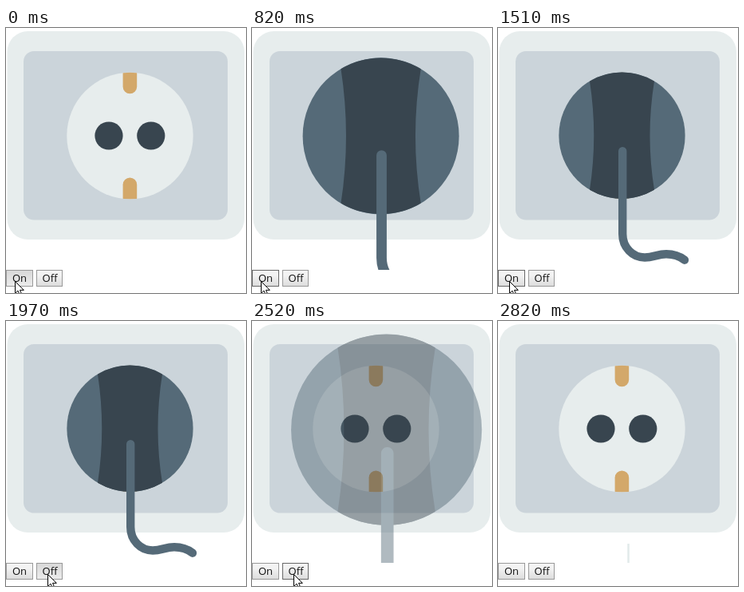
Write an HTML page that moves like this. It is 301 by 332 pixels and loops after 3400 ms.

```html
<!DOCTYPE html>
<html lang="en">
<head>
<meta charset="utf-8">
<title>Plug and socket</title>
<style>
  html, body { margin: 0; width: 100%; height: 100%; overflow: hidden; background: #fff; }
  svg { display: block; width: 301px; height: 332px; }
  .button rect { fill: url(#idle); stroke: #999; }
  .button.hover rect { fill: url(#idle); stroke: #686868; }
  .button.pressed rect { fill: url(#down); stroke: #999; }
  .button text { font: 13px "Open Sans", "Noto Sans", sans-serif; text-anchor: middle; fill: #111; }
</style>
</head>
<body>
<svg viewBox="0 0 301 332">
  <defs>
    <linearGradient id="idle" x2="0" y2="1">
      <stop offset=".3" stop-color="#f3f3f3"/><stop offset="1" stop-color="#dcdcdc"/>
    </linearGradient>
    <linearGradient id="down" x2="0" y2="1">
      <stop offset="0" stop-color="#d8d8d8"/><stop offset="1" stop-color="#ececec"/>
    </linearGradient>
    <clipPath id="view"><rect y="3" width="300" height="300"/></clipPath>
    <clipPath id="face"><circle cx="155.5" cy="135" r="79.2"/></clipPath>
  </defs>

  <g id="socket">
    <rect x="1.5" y="4" width="297.5" height="261" rx="26" fill="#e7eded"/>
    <rect x="22" y="29" width="256" height="211.5" rx="13" fill="#cbd4da"/>
    <circle cx="155.5" cy="135" r="79.2" fill="#e7eded"/>
    <g fill="#d3a86a" clip-path="url(#face)">
      <rect x="146.6" y="40" width="17.6" height="42.3" rx="8.8"/>
      <rect x="146.6" y="187.5" width="17.6" height="42" rx="8.8"/>
    </g>
    <g fill="#38454f">
      <circle cx="129" cy="135" r="17.6"/>
      <circle cx="181.8" cy="135" r="17.6"/>
    </g>
  </g>

  <g clip-path="url(#view)">
    <g id="plug">
      <circle cx="155.5" cy="134.7" r="79.2" fill="#556a78"/>
      <path d="M115 66.7A79.2 79.2 0 0 1 196 66.7Q185 134.7 196 202.7A79.2 79.2 0 0 1 115 202.7Q125.5 134.7 115 66.7Z" fill="#38454f"/>
      <path d="M156.2 154.3V258C156.2 275 169 287.5 184 287.5C195 287.5 200 283.3 211 283.3C220 283.3 228 286 234 290.7"
        fill="none" stroke="#556a78" stroke-width="10.4" stroke-linecap="round"/>
    </g>
  </g>
  <rect id="sliver" x="162.3" y="279" width="2.5" height="24" fill="#e2eaea"/>

  <g id="on" class="button">
    <rect x=".5" y="303.5" width="33" height="20"/><text x="17" y="318">On</text>
  </g>
  <g id="off" class="button">
    <rect x="38.5" y="303.5" width="32" height="20"/><text x="55" y="318">Off</text>
  </g>
  <path id="cursor" d="M.5 .5V15.5L4 12.2 6.6 18 9 17 6.5 11.4H11.3Z" fill="#fff" stroke="#000"/>
</svg>
<script>
const LOOP = 3400;
const ORIGIN = [129.7, 131.8];
const [plug, sliver, on, off, cursor] =
  ["plug", "sliver", "on", "off", "cursor"].map(id => document.getElementById(id));

// The picture is held between these moments.
const TICKS = [0,
  580, 650, 730, 810, 890, 970, 1050,
  1510, 1590, 1660, 1740, 1820, 1890, 1970,
  2120, 2200, 2270, 2350, 2430, 2520, 2580, 2660, 2740, 2820];

const progress = (t, start, length) => Math.min(1, Math.max(0, (t - start) / length));

// Same curve as cubic-bezier(.42, 0, 1, 1), solved by bisection.
function easeIn(x) {
  let lo = 0, hi = 1;
  for (let i = 0; i < 24; i++) {
    const u = (lo + hi) / 2;
    const at = 1.26 * u * (1 - u) ** 2 + 3 * u * u * (1 - u) + u ** 3;
    if (at < x) lo = u; else hi = u;
  }
  return lo * lo * (3 - 2 * lo);
}

function setButton(el, hover, pressed) {
  el.setAttribute("class", "button" + (pressed ? " pressed" : hover ? " hover" : ""));
}

function draw(t) {
  const leaving = t >= 2120;
  const away = leaving
    ? easeIn(progress(t, 2043, 717))
    : easeIn(1 - progress(t, 522, 500));
  const scale = 1 + away;
  const [x, y] = ORIGIN;
  plug.setAttribute("transform", `translate(${-x * away} ${-y * away}) scale(${scale})`);
  plug.setAttribute("opacity", t < 580 ? 0 : leaving ? Math.max(0, 1 - 1.06 * away) : 1);
  sliver.style.display = t >= 2820 ? "" : "none";

  const p = progress(t, 1440, 450);
  const tip = 11 + 41 * p * p * (3 - 2 * p);
  const shown = t < 2740;
  cursor.style.display = shown ? "" : "none";
  cursor.setAttribute("transform", `translate(${Math.round(tip)} 317)`);
  setButton(on, shown && tip < 34, t < 580);
  setButton(off, shown && tip >= 38, t >= 1970 && t < 2120);
}

function frame(now) {
  const t = now % LOOP;
  draw(TICKS.filter(tick => tick <= t).pop());
  requestAnimationFrame(frame);
}

draw(0);
requestAnimationFrame(frame);
</script>
</body>
</html>
```
